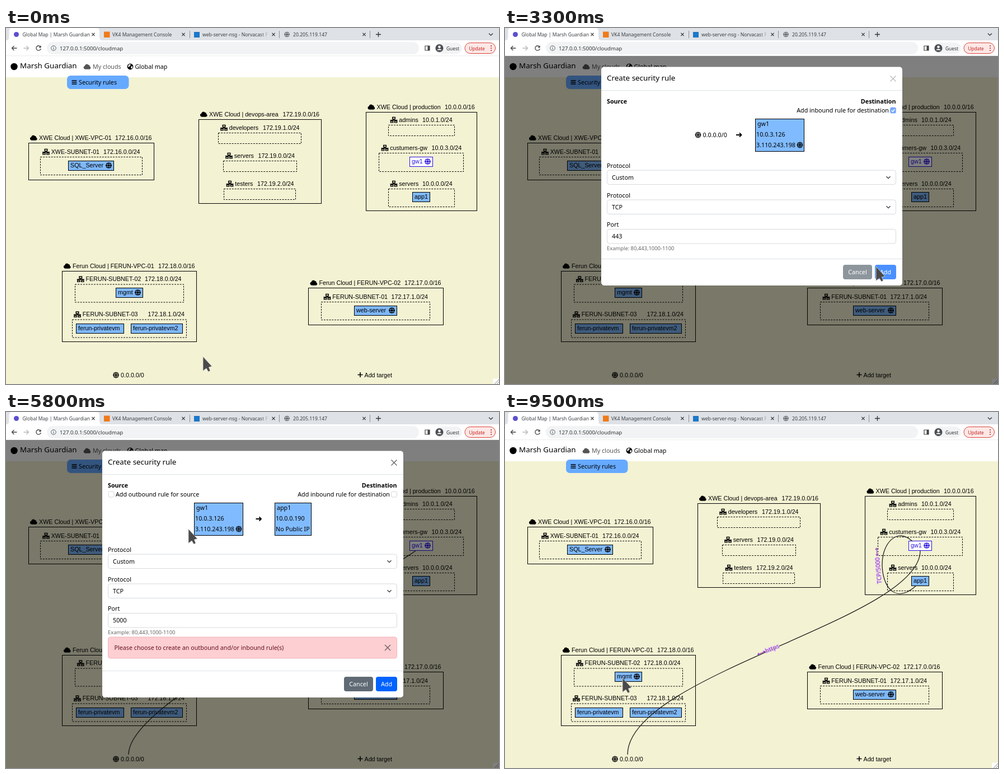
An HTML page that plays this animation: 881x636 px, repeating every 9.6 s.

```html
<!DOCTYPE html>
<html lang="en">
<head>
<meta charset="utf-8">
<title>Global map</title>
<style>
  html, body { margin: 0; height: 100%; overflow: hidden; }
  svg { display: block; width: 100vw; height: 100vh; }
  text { font: 10.72px "Noto Sans", sans-serif; white-space: pre; }
  .map text { font-family: "Liberation Sans", Arial, sans-serif; }
  .tabs text { font-size: 8.6px; }
  text.title { font-size: 13.4px; }
  text.bold { font-weight: 700; }
  text.hint { font-size: 9.4px; }
  .links text { font: 500 10.7px "Noto Sans", sans-serif; }
</style>
</head>
<body>
<svg id="stage" viewBox="0 0 881 636"></svg>
<script>
const BEIGE = '#f3f2d3', NODE = '#7fb8f8', CARD = '#80bbff', BLUE = '#0a62fa';

// Drawing helpers: y is the vertical middle of a text line.
const text = (x, y, s, a = '') => `<text x="${x}" y="${y + 3.8}" ${a}>${s}</text>`;
const rect = (x, y, w, h, fill, a = '') =>
  `<rect x="${x}" y="${y}" width="${w}" height="${h}" fill="${fill}" ${a}/>`;
const frame = (x1, y1, x2, y2, fill = 'none', a = 'stroke="#000"') =>
  rect(x1 + .5, y1 + .5, x2 - x1 - 1, y2 - y1 - 1, fill, a);
const line = (d, color = '#000', w = 1, a = '') =>
  `<path d="${d}" fill="none" stroke="${color}" stroke-width="${w}" ${a}/>`;
const shape = (d, fill = '#000') => `<path d="${d}" fill="${fill}"/>`;
const dot = (x, y, r, fill = '#000', a = '') => `<circle cx="${x}" cy="${y}" r="${r}" fill="${fill}" ${a}/>`;
const at = (x, y, s, a = '') => `<g transform="translate(${x} ${y}) ${a}">${s}</g>`;
const cross = (x, y, r, color, w = 1.2) =>
  line(`M${x - r} ${y - r}l${2 * r} ${2 * r}m0 ${-2 * r}l${-2 * r} ${2 * r}`, color, w);
const chevron = (x, y, w = 1.3) => line(`M${x - 3.5} ${y - 1.8}l3.5 3.5 3.5 -3.5`, '#333', w);

const cloud = (x, y, fill = '#000') => at(x, y - 4.7,
  shape('M3 9.4A3 3 0 0 1 2.2 3.5 3.6 3.6 0 0 1 8.7 1.7 2.4 2.4 0 0 1 11 4.4 2.6 2.6 0 0 1 10.6 9.4Z', fill));
const net = (x, y) => at(x, y - 5.3, line(
  'M4.2 .8h4.6v3.2h-4.6zM6.5 4v2M0 6h13M3 6v1.8M10 6v1.8M.9 7.7h4.2v2.5h-4.2zM7.9 7.7h4.2v2.5h-4.2z', '#000', 1.4));
const globe = (x, y, gap, color = '#000', r = 5.4) => at(x, y, dot(0, 0, r, color) +
  line(`M${-r} -1.9H${r}M${-r} 1.9H${r}M-1 ${-r}Q-4 0 -1 ${r}M1 ${-r}Q4 0 1 ${r}`, gap, .7));
const arrow = (x, y) => at(x, y, line('M-5 0H4.5M1 -3.5L4.5 0 1 3.5', '#000', 1.8));

function browser() {
  const tabs = [
    [29.5, 'Global Map | Marsh Guardian', 156], [190, 'VK4 Management Console', 317],
    [351, 'web-server-nsg - Norvacast F', 478], [513, '20.205.119.147', 640]];
  return `<g class="tabs">` + rect(0, 0, 881, 22, '#dee1e6') + rect(0, 22, 881, 28, '#fff') +
    shape('M0 22Q5.5 22 5.5 16V6Q5.5 0 10 0H162Q167 0 167 6V16Q167 22 172 22Z', '#fff') +
    tabs.map(([x, s, end]) => text(x, 11.5, s, 'fill="#3c4043" style="letter-spacing:0"') + cross(end, 11.5, 2.6, '#333')).join('') +
    rect(455, 4, 15, 15, 'url(#fade)') + rect(470, 4, 4, 15, '#dee1e6') +
    [328, 488, 650].map(x => rect(x, 5, 1, 13, '#8b8f94')).join('') +
    dot(18.5, 11.5, 4.5, '#5b4fd0') + rect(175, 6.5, 10.5, 10.5, '#ef7b1a') +
    rect(336, 7, 10, 10, '#1c78c8') + globe(502, 11.5, '#dee1e6', '#5f6368', 4.8) +
    line('M661 11.5h9M665.5 7v9', '#333', 1.3) + chevron(866.5, 11.5) +
    line('M19.5 36H10.5M14.5 32L10.5 36 14.5 40', '#444', 1.3) +
    line('M31.5 36H40.5M36.5 32L40.5 36 36.5 40', '#b5b8bc', 1.3) +
    line('M61.3 33.2A4.2 4.2 0 1 0 62.2 37', '#444', 1.3) + shape('M62.6 31v4.2h-4.2z', '#444') +
    rect(73, 25, 665, 22, '#f1f3f4', 'rx="11"') +
    dot(85, 36, 4.3, 'none', 'stroke="#5f6368"') + line('M85 35.4v3M85 33.2v1.2', '#5f6368', 1.1) +
    text(96, 35.8, '127.0.0.1:5000/cloudmap', 'fill="#333" style="font-size:9.55px"') +
    line('M749 32h8v8h-8z', '#444', 1.2) + rect(753.5, 32, 3.5, 8, '#444') +
    rect(766, 26, 49, 20, '#f1f3f4', 'rx="10"') + dot(774.5, 36, 7, '#4a4d51') +
    dot(774.5, 33.7, 2.3, '#fff') + shape('M770.3 39.6a4.4 3.2 0 0 1 8.4 0z', '#fff') +
    text(787, 35.8, 'Guest', 'fill="#333" style="font-size:8.4px"') +
    rect(820, 26.5, 54.5, 19, '#fce8e6', 'rx="9.5" stroke="#d9453a"') +
    text(827.5, 35.8, 'Update', 'fill="#c5221f" style="font-size:8.2px"') +
    [32, 36, 40].map(y => dot(867, y, 1.1, '#c5221f')).join('') + '</g>';
}

function navbar() {
  return rect(0, 50, 881, 38, '#fff') + rect(0, 49.5, 881, .6, '#ddd') + rect(0, 88, 881, 548, BEIGE) +
    dot(14.5, 69, 6.2) + text(25, 68.5, 'Marsh Guardian', 'class="title"') +
    cloud(138.7, 69, '#555') + text(155, 69, 'My clouds', 'fill="#555"') +
    dot(222, 69, 5.4) + shape('M219 66q3 -3 4 0l-2 2 -1 2 -2 -1zM223 69l3 -1 0 3 -2 2z', '#fff') +
    text(230.5, 69, 'Global map') +
    rect(109, 85, 110.5, 24, '#66aaff', 'rx="6.5"') +
    line('M117.5 94h9M117.5 97h9M117.5 100h9', '#000', 1.3) + text(130, 97, 'Security rules');
}

const vpc = (x, y, name, cx, cidr, x1, x2, y2) => cloud(x, y) + text(x + 16, y, name) +
  text(cx, y, cidr) + frame(x1, y + 9, x2, y2);
const subnet = (x, y, name, cx, cidr, x1, x2, h) => net(x, y) + text(x + 15.7, y, name) +
  text(cx, y, cidr) + frame(x1, y + 9, x2, y + 9 + h, 'none', 'stroke="#000" stroke-dasharray="2.8 2"');
const node = (x1, y, x2, name, open, fill = NODE, color = '#000') =>
  frame(x1, y, x2, y + 18, fill, `stroke="${color}"`) + text(x1 + 4, y + 8.5, name, `fill="${color}"`) +
  (open ? globe(x2 - 9.5, y + 8.5, fill, color) : '');

function cloudMap() {
  return '<g class="map">' +
    vpc(43, 196, 'XWE Cloud | XWE-VPC-01', 195, '172.16.0.0/16', 40, 265, 272) +
    subnet(65, 221, 'XWE-SUBNET-01', 174, '172.16.0.0/24', 61, 244, 33) +
    node(111, 237, 193, 'SQL_Server', 1) +
    vpc(347, 154, 'XWE Cloud | devops-area', 494.5, '172.19.0.0/16', 344, 564, 314) +
    subnet(383, 178, 'developers', 459, '172.19.1.0/24', 379, 528, 20) +
    subnet(392, 228, 'servers', 450.5, '172.19.0.0/24', 388, 520, 20) +
    subnet(393.5, 278, 'testers', 449, '172.19.2.0/24', 389, 518, 20) +
    vpc(646.5, 141, 'XWE Cloud | production', 784, '10.0.0.0/16', 643, 842, 327) +
    subnet(686.5, 164, 'admins', 744, '10.0.1.0/24', 683, 802, 20) +
    subnet(670.5, 214, 'custumers-gw', 760.5, '10.0.3.0/24', 666, 818, 34) +
    node(721, 230, 763, 'gw1', 1, '#fff', '#2a12e0') +
    subnet(686.5, 278, 'servers', 744, '10.0.0.0/24', 683, 802, 33) +
    node(726, 293, 758, 'app1') +
    vpc(103, 425, 'Ferun Cloud | FERUN-VPC-01', 272, '172.18.0.0/16', 100, 341, 561) +
    subnet(126.8, 448.5, 'FERUN-SUBNET-02', 248, '172.18.0.0/24', 123, 318, 33) +
    node(196, 464, 245, 'mgmt', 1) +
    subnet(121, 511.5, 'FERUN-SUBNET-03', 253.5, '172.18.1.0/24', 118, 323, 33) +
    node(125, 528, 211, 'ferun-privatevm') + node(223, 528, 316, 'ferun-privatevm2') +
    vpc(543.5, 455, 'Ferun Cloud | FERUN-VPC-02', 712, '172.17.0.0/16', 540, 782, 531) +
    subnet(567.5, 480, 'FERUN-SUBNET-01', 688.5, '172.17.1.0/24', 563, 758, 33) +
    node(622, 496, 699, 'web-server', 1) +
    globe(196.5, 620, BEIGE) + text(205, 620, '0.0.0.0/0') +
    line('M628.5 619.5h9M633 615v9', '#000', 1.6) + text(640.5, 620, 'Add target') + '</g>' +
    rect(870.5, 626.5, 10.5, 9.5, '#fff') + line('M873 636l8 -8M877 636l4 -4', '#888', 1);
}

const tag = (x, y, angle, s, tx, ax) => at(x, y,
  text(tx, 0, s, 'fill="#9a32cd" stroke="#e6d6ea" stroke-width="2" paint-order="stroke"') +
  line(`M${ax} 0h14m-11 -2l-3 2 3 2m8 -4l3 2 -3 2`, '#9a32cd', 1.1), `rotate(${angle})`);
const wire = d => line(d, '#222', 1.3);

function links(t) {
  if (t < 3700) return '';
  if (t < 9200) return wire('M219 612C219 522 550 370 732 248') + tag(447, 402, -29, 'https', -6, -21);
  return wire('M219 612C219 470 742 370 742 248') + tag(471, 425, -23, 'https', -6, -21) +
    wire('M728 231C700 205 674 235 674 272S695 345 734 311') + tag(666.5, 275, -95, 'TCP/5000', -32, 18);
}

function check(x, y, on, faint) {
  return on
    ? `<g opacity="${faint ? .55 : 1}">` + rect(x, y, 10.6, 10.6, BLUE, 'rx="2.5"') +
      line(`M${x + 2.7} ${y + 5.4}l2 2.1 3.6 -4`, '#fff', 1.5) + '</g>'
    : rect(x + .3, y + .3, 10, 10, '#fff', 'rx="2.5" stroke="#ccc" stroke-width=".8"');
}

// boxes: undefined for plain rows, otherwise the checked state of the address
function card(x, w, name, ip, last, open, boxes) {
  const pick = boxes !== undefined, tx = x + (pick ? 15 : 2);
  return frame(x, 162, x + w + 1, 221, CARD) + text(x + 4, 171, name) +
    (pick ? check(x + 2.5, 184.5, boxes) : '') + text(tx, 190, ip) +
    (pick && open ? check(x + 2.5, 204, false) : '') + text(open ? tx : x + 2, 209, last) +
    (open ? globe(x + w - 7, 209, CARD) : '');
}

const field = (y, label, value, select, focus) => text(182, y, label) +
  (focus ? rect(180.5, y + 6, 520, 30, '#b9d5fb', 'rx="5"') : '') +
  rect(182.5, y + 8, 516, 25.5, '#fff', `rx="4" stroke="${focus ? '#86b7fe' : '#d5d9dd'}"`) +
  text(191, y + 21, value) + (select ? chevron(685, y + 21) : '');

const services = ('nntps noclog nqs nrpe nsca ntalk ntp nut omniorb openvpn ospf6d ospfapi ospfd ' +
  'passwd-server pawserv pcrd pop3 pop3s poppassd postgresql').split(' ');
function dropdown() {
  return frame(183, 280, 699, 592, '#fff', 'stroke="#777"') + rect(184, 575, 504, 16, '#168bfc') +
    services.map((s, i) => text(191.5, 288 + i * 15.53, s, i == 19 ? 'fill="#fff"' : 'fill="#222"')).join('') +
    rect(688, 281, 10, 310, '#f1f1f1') + rect(689, 449, 8, 20.5, '#c1c1c1') +
    shape('M690.5 287.5h5l-2.5 -3z', '#444') + shape('M690.5 584h5l-2.5 3z', '#444');
}

function modal(t) {
  const first = t < 4000, custom = t >= (first ? 1700 : 5000), error = !first && t >= 5600;
  const busy = first ? t >= 3200 : t >= 8500, open = first && t >= 1200 && !custom;
  const out = t >= 6200, inbound = first || t >= 7300;
  const foot = error ? 462 : custom ? 412 : 291;
  const typed = (s, from) => s.slice(0, Math.max(0, Math.floor((t - from) / 100)));
  let s = rect(172, 69.5, 538, foot - 21.5, '#fff', 'rx="5"') +
    rect(172, 111, 538, 1, '#dee2e6') + rect(172, foot, 538, 1, '#dee2e6') +
    text(182, 89.7, 'Create security rule', 'class="title"') + cross(693.5, 90.5, 5, busy ? '#bbb' : '#666', 1.4) +
    text(182, 131, 'Source', 'class="bold"') +
    text(698.5, 131, 'Destination', 'class="bold" text-anchor="end"') +
    text(686, 147, 'Add inbound rule for destination', 'text-anchor="end"') + check(688.2, 141.8, inbound, first);
  if (first) {
    s += globe(345, 191, '#fff') + text(353.5, 191, '0.0.0.0/0') + arrow(418, 191) +
      card(447, 87, 'gw1', '10.0.3.126', '3.110.243.198', true);
  } else {
    const sw = out ? 101 : 87, dw = inbound ? 69 : 65, x = 440.5 - (sw + 57 + dw) / 2;
    s += check(182.7, 141.8, out) + text(196, 147, 'Add outbound rule for source') +
      card(x, sw, 'gw1', '10.0.3.126', '3.110.243.198', true, out ? t >= 6700 : undefined) +
      arrow(x + sw + 28.5, 191) +
      card(x + sw + 57, dw, 'app1', '10.0.0.190', 'No Public IP', false, inbound ? t >= 7800 : undefined);
  }
  s += field(246, 'Protocol', custom ? 'Custom' : 'postgresql', true, open);
  if (custom) s += field(299, 'Protocol', 'TCP', true) +
    field(351.5, 'Port', first ? typed('443', 2200) : typed('5000', 5000)) +
    text(182, 393.5, 'Example: 80,443,1000-1100', 'class="hint" fill="#666"');
  if (error) s += rect(182.5, 402, 516, 38, '#fdcfd2', 'rx="4" stroke="#f3b4ba"') +
    text(193.5, 421, 'Please choose to create an outbound and/or inbound rule(s)', 'fill="#64101c"') +
    cross(682, 421, 5, busy ? '#b99a9c' : '#6f5b5d', 1.4);
  s += `<g opacity="${busy ? .7 : 1}" text-anchor="middle">` +
    rect(604, foot + 11, 52, 26, '#5f6a74', 'rx="4"') + text(630, foot + 24, 'Cancel', 'fill="#fff"') +
    rect(661, foot + 11, 38, 26, '#0062ff', 'rx="4"') + text(680, foot + 24, 'Add', 'fill="#fff"') + '</g>';
  return s + (open ? dropdown() : '');
}

// Pointer stops: time, x, y
const path = [
  [0, 352, 587], [300, 222, 622], [400, 222, 622], [800, 742, 241], [1000, 742, 241], [1200, 396, 271],
  [1500, 396, 271], [1700, 250, 300], [2100, 230, 372], [2700, 230, 372], [3100, 663, 426], [3800, 663, 426],
  [4000, 742, 240], [4200, 742, 240], [4400, 741, 302], [4600, 741, 302], [4800, 400, 267], [5000, 400, 267],
  [5400, 672, 484], [5600, 672, 484], [5800, 326, 209], [6100, 188, 148], [6300, 188, 148], [6600, 334, 190],
  [6800, 334, 190], [7200, 693, 148], [7400, 693, 148], [7800, 492, 190], [7900, 492, 190], [8200, 675, 485],
  [9000, 675, 485], [9400, 210, 475], [9600, 210, 475]];
function pointer(t) {
  const i = path.findIndex(p => p[0] > t), [a, x, y] = path[i - 1], [b, u, v] = path[i];
  const k = (t - a) / (b - a);
  return at(x + (u - x) * k, y + (v - y) * k,
    '<path d="M0 0V25.5L6 21 9.5 27 13 25.5 10.5 19 16 17.5Z" fill="#4a4a4a" stroke="#d8d8d8" stroke-width=".8"/>');
}

const dialogs = [[900, 3800], [4400, 9100]];
function render(t) {
  const d = dialogs.find(([a, b]) => t >= a && t <= b);
  const dim = !d ? 0 : t == d[0] ? .12 : t == d[1] ? .2 : .5;
  live.innerHTML = `<g class="links">${links(t)}</g>` + rect(0, 50, 881, 586, '#000', `opacity="${dim}"`) +
    (dim == .5 ? modal(t) : '') + pointer(t);
}

const stage = document.getElementById('stage');
stage.innerHTML = '<defs><linearGradient id="fade"><stop stop-color="#dee1e6" stop-opacity="0"/>' +
  '<stop offset="1" stop-color="#dee1e6"/></linearGradient></defs>' +
  browser() + navbar() + cloudMap() + '<g id="live"></g>';
const live = document.getElementById('live');

const start = performance.now();
let shown = -1;
function tick() {
  const t = Math.floor((performance.now() - start) % 9600 / 100) * 100;
  if (t != shown) render(shown = t);
  requestAnimationFrame(tick);
}
tick();
</script>
</body>
</html>
```
